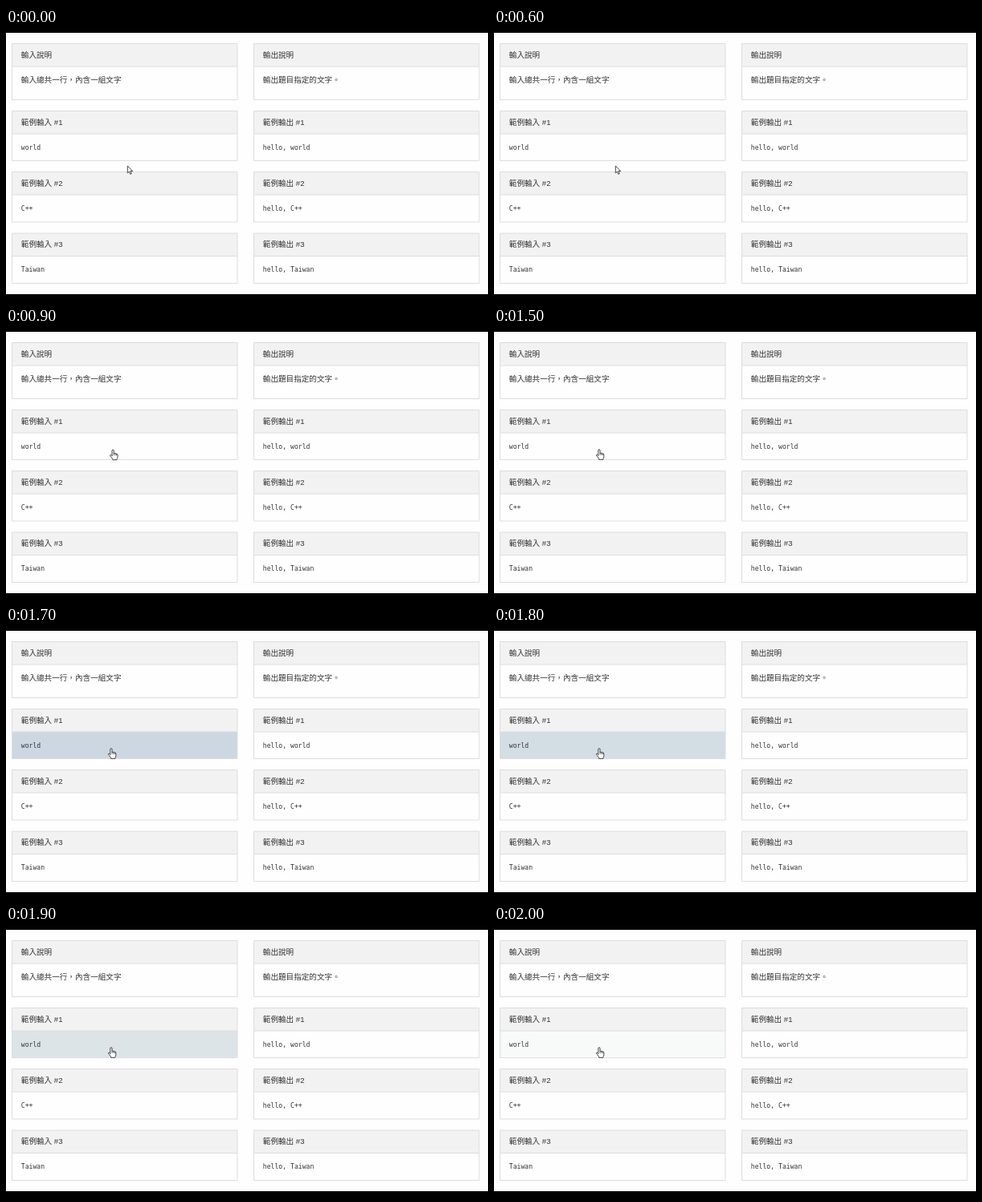
An HTML page that plays this animation: 600x338 px, repeating every 2.5 s.

```html
<!DOCTYPE html>
<html lang="zh-Hant">
<head>
<meta charset="utf-8">
<title>範例輸入輸出</title>
<style>
  html, body { margin: 0; width: 100%; height: 100%; overflow: hidden; background: #000; }
  svg { display: block; width: 100%; height: 100%; }
  text { font: 300 9.6px "Liberation Sans", "Noto Sans CJK TC", "Noto Sans CJK", sans-serif; fill: #333; white-space: pre; }
  .code { font: 8.15px "DejaVu Sans Mono", monospace; }
  .frame { fill: none; stroke: #dddce2; }
  .cursor { fill: #fff; stroke: #333; stroke-width: .9; stroke-linejoin: round; stroke-linecap: round; }
</style>
</head>
<body>
<svg viewBox="0 0 600 338">
  <rect y="6" width="600" height="326" fill="#fefefe"/>
  <rect id="flash" x="8" y="132" width="280" height="34"/>
  <g id="panels"></g>
  <path id="arrow" class="cursor" d="M0 0V8.6L2 6.8L3.5 10L5 9.3L3.5 6.2H6Z"/>
  <g id="hand" class="cursor">
    <path d="M3 8V1.6a1.1 1.1 0 0 1 2.2 0V5.2q1-.7 1.8.2q1-.5 1.6.4q1.4-.2 1.4 1.2V9.6q0 1.3-.9 2.4V13.2H3.8V12L.7 8.2q-.5-1 .5-1.3q.9-.1 1.8 1.1Z"/>
    <path fill="none" d="M5.2 5.2V7.2M7 5.4V7.4M8.6 5.8V7.6" stroke-width=".7"/>
  </g>
</svg>
<script>
const LOOP = 2500;
const rows = [
  { top: 19.5, height: 70, label: "說明", bodies: ["輸入總共一行，內含一組文字", "輸出題目指定的文字。"] },
  { top: 103.5, height: 62, label: "範例", number: 1, bodies: ["world", "hello, world"] },
  { top: 179.5, height: 62.5, label: "範例", number: 2, bodies: ["C++", "hello, C++"] },
  { top: 256, height: 62.5, label: "範例", number: 3, bodies: ["Taiwan", "hello, Taiwan"] }
];
const columns = [{ x: 7.5, word: "輸入" }, { x: 308.5, word: "輸出" }];

function panel({ top, height, label, number, bodies }, { x, word }, index) {
  const title = number ? `${label}${word} #${number}` : word + label;
  return `<rect x="${x}" y="${top}" width="280.5" height="28.5" fill="#f2f2f2"/>
    <path class="frame" d="M${x} ${top}h280.5v${height}h-280.5zM${x} ${top + 28.5}h280.5"/>
    <text x="${x + 11.3}" y="${top + 17.2}">${title}</text>
    <text x="${x + 11.3}" y="${top + 48.2}" class="${number ? "code" : ""}">${bodies[index]}</text>`;
}

const byId = id => document.getElementById(id);
byId("panels").innerHTML = rows.map(row => columns.map((col, i) => panel(row, col, i)).join("")).join("");

// Each step holds from its start time until the next one.
const cursorSteps = [
  [0, "arrow", 151.3, 172.3],
  [800, "hand", 138, 160],
  [900, "hand", 129, 152.5],
  [1500, "hand", 126.8, 152.2]
];
const flashSteps = [
  [0, "none"],
  [1700, "#ccd7e1"],
  [1800, "#d3dde4"],
  [1900, "#dce4e8"],
  [2000, "#f8faf9"]
];
const stepAt = (steps, time) => steps.findLast(([start]) => start <= time);

function draw() {
  const time = performance.now() % LOOP;
  const [, shape, x, y] = stepAt(cursorSteps, time);
  for (const id of ["arrow", "hand"]) {
    byId(id).setAttribute("visibility", id === shape ? "visible" : "hidden");
    byId(id).setAttribute("transform", `translate(${x} ${y})`);
  }
  byId("flash").setAttribute("fill", stepAt(flashSteps, time)[1]);
  requestAnimationFrame(draw);
}
draw();
</script>
</body>
</html>
```
